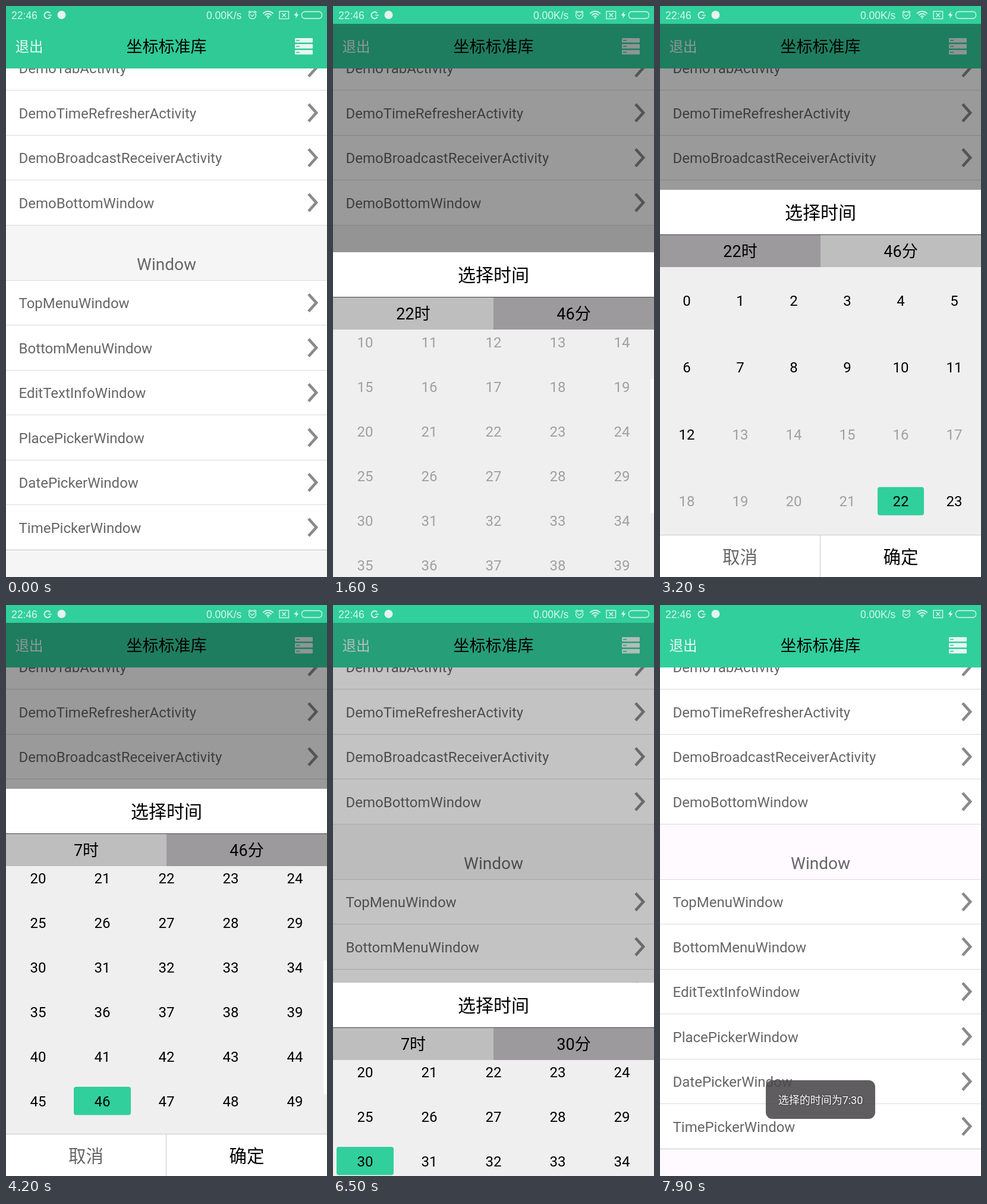
Write an HTML page with a canvas that moves like this. It is 540 px wide and 960 px high and loops after 8.1 s.

```html
<!DOCTYPE html>
<html lang="zh">
<head>
<meta charset="utf-8">
<title>选择时间</title>
<style>
html, body { margin: 0; width: 100%; height: 100%; overflow: hidden; background: #fff; }
canvas { display: block; width: 540px; height: 960px; }
</style>
</head>
<body>
<canvas id="stage" width="540" height="960"></canvas>
<script>
const ctx = document.getElementById('stage').getContext('2d');
const LOOP = 8100;
const STEP = 100;
const SANS = 'Roboto, "Noto Sans CJK SC", "Noto Sans CJK", sans-serif';
const GREEN = '#31cf9b';
const PANEL_H = 651;
const GRID_H = 450;
const MAX_SCROLL = 317.5;

// Row centre and label
const ROWS = [
  [104.5, 'DemoTabActivity'],
  [180, 'DemoTimeRefresherActivity'],
  [255.5, 'DemoBroadcastReceiverActivity'],
  [331, 'DemoBottomWindow'],
  [499.5, 'TopMenuWindow'],
  [575, 'BottomMenuWindow'],
  [650.5, 'EditTextInfoWindow'],
  [726, 'PlacePickerWindow'],
  [801.5, 'DatePickerWindow'],
  [877, 'TimePickerWindow']
];

const clamp = v => Math.min(1, Math.max(0, v));
const span = (t, a, b) => clamp((t - a) / (b - a));
const ease = p => (1 - Math.cos(Math.PI * p)) / 2;

function rect(x, y, w, h, color) {
  ctx.fillStyle = color;
  ctx.fillRect(x, y, w, h);
}

function round(x, y, w, h, r, color) {
  ctx.fillStyle = color;
  ctx.beginPath();
  ctx.roundRect(x, y, w, h, r);
  ctx.fill();
}

function text(str, x, y, size, color, align = 'center', family = SANS) {
  ctx.font = `${size}px ${family}`;
  ctx.textAlign = align;
  ctx.fillStyle = color;
  ctx.fillText(str, x, y);
}

function line(points, width, color) {
  ctx.strokeStyle = color;
  ctx.lineWidth = width;
  ctx.beginPath();
  points.forEach(([x, y]) => ctx.lineTo(x, y));
  ctx.stroke();
}

function arc(x, y, r, a, b, width = 1.4) {
  ctx.lineWidth = width;
  ctx.beginPath();
  ctx.arc(x, y, r, a, b);
  ctx.stroke();
}

function drawList(pressed, gap) {
  rect(0, 0, 540, 960, '#fff');
  rect(0, 368, 540, 93, gap);
  rect(0, 915, 540, 45, gap);
  if (pressed) rect(0, 839, 540, 75, '#dedede');
  for (const [y, label] of ROWS) {
    text(label, 21.5, y + 8.5, 24, '#666', 'left');
    line([[509, y - 15], [522, y - 0.5], [509, y + 14]], 4.8, '#8a8a8a');
    rect(0, Math.floor(y + 37), 540, 1, y > 870 ? '#c4c4c8' : '#dadada');
  }
  rect(0, 461, 540, 1, '#dedade');
  text('Window', 270, 444, 28, '#666');
}

function drawHeader(green) {
  rect(0, 0, 540, 105, green);
  text('退出', 15.5, 77, 23.5, '#effbf6', 'left');
  text('坐标标准库', 270, 78, 27, '#000');
  for (let y = 54; y < 80; y += 10) {
    round(486, y, 30, 7.5, 1, '#e6f7f0');
    rect(488, y + 3, 6, 1.5, green);
  }
}

function drawStatus(green) {
  const ink = '#d8f6ea';
  const family = '"Liberation Sans", Arial, sans-serif';
  rect(0, 0, 540, 30, green);
  text('22:46', 9, 21.5, 17.5, ink, 'left', family);
  text('0.00K/s', 337, 21.5, 17.5, ink, 'left', family);
  ctx.strokeStyle = ink;
  arc(70, 15.5, 5.5, 0.5, 5.6, 2);
  line([[71, 15.5], [77, 15.5]], 1.5, ink);
  ctx.fillStyle = '#e4f4ed';
  ctx.beginPath();
  ctx.arc(93.5, 15, 7, 0, 7);
  ctx.fill();
  // alarm clock
  arc(414.5, 15.5, 6, 0, 7);
  line([[411, 14.5], [414, 17.5], [418, 14]], 1.2, ink);
  line([[407.5, 11], [411, 8]], 1.5, ink);
  line([[418, 8], [421.5, 11]], 1.5, ink);
  // wifi
  for (const r of [3.5, 7.5, 11.5]) arc(441, 20.5, r, -Math.PI * 0.77, -Math.PI * 0.23, 1.9);
  round(439.7, 18.7, 2.6, 2.6, 1.3, ink);
  // no card
  ctx.lineWidth = 1.4;
  ctx.strokeRect(460, 9, 15.5, 12.5);
  line([[464.5, 12], [471, 18.5]], 1.4, ink);
  line([[471, 12], [464.5, 18.5]], 1.4, ink);
  // charging bolt
  ctx.fillStyle = ink;
  ctx.beginPath();
  [[490, 9], [484.5, 16], [488, 16], [487, 21], [492.5, 14], [489, 14]]
    .forEach(([x, y]) => ctx.lineTo(x, y));
  ctx.fill();
  // battery
  ctx.lineWidth = 1.3;
  ctx.beginPath();
  ctx.roundRect(497.5, 9.5, 34, 11.5, 5);
  ctx.stroke();
}

function drawGrid(top, grid) {
  const { count, cols, rowH, scroll, picked, enabled } = grid;
  const colW = 540 / cols;
  for (let i = 0; i < count; i++) {
    const x = (i % cols + 0.5) * colW;
    const y = top + (Math.floor(i / cols) + 0.5) * rowH - scroll;
    if (y < top - rowH || y > top + GRID_H + rowH) continue;
    if (i === picked) round(x - colW / 2 + 6, y - 24, colW - 12, 47.5, 4, GREEN);
    text(i, x, y + 8.5, 24, enabled(i) ? '#000' : '#a0a0a0');
  }
}

function drawPanel(top, s) {
  ctx.save();
  ctx.translate(0, top);
  rect(0, 0, 540, PANEL_H, '#efefef');
  rect(0, 0, 540, 75, '#fff');
  text('选择时间', 270, 49, 30, '#000');
  rect(0, 76, 270, 54, s.hourTab ? '#9c9a9c' : '#bebebe');
  rect(270, 76, 270, 54, s.hourTab ? '#bebebe' : '#9c9a9c');
  rect(0, 75, 540, 1, '#444');
  text(s.hour + '时', 135, 112.5, 27, '#000');
  text(s.minute + '分', 405, 112.5, 27, '#000');

  ctx.save();
  ctx.beginPath();
  ctx.rect(0, 130, 540, GRID_H);
  ctx.clip();
  if (s.hourTab) {
    drawGrid(130, {
      count: 24, cols: 6, rowH: 112.5, scroll: 0, picked: s.hour,
      enabled: i => i <= 12 || i >= 22
    });
  } else {
    drawGrid(130, {
      count: 60, cols: 5, rowH: 75, scroll: s.scroll, picked: s.minute,
      enabled: i => s.hour < 22 || i >= 46
    });
    rect(534, 130 + s.scroll / 2, 6, GRID_H / 2, `rgba(255,255,255,${0.75 * s.bar})`);
  }
  ctx.restore();

  rect(0, 581, 269, 70, '#fff');
  rect(270, 581, 270, 70, s.confirm ? '#efefef' : '#fff');
  rect(0, 580, 540, 1, '#c8c8c8');
  rect(269, 581, 1, 70, '#c8c8c8');
  text('取消', 134.5, 628, 29.5, '#666');
  text('确定', 405, 628, 29.5, '#000');
  ctx.restore();
}

function drawToast(alpha) {
  ctx.save();
  ctx.globalAlpha = alpha;
  round(178, 799, 184, 65, 11, 'rgba(75,71,75,0.88)');
  ctx.shadowColor = 'rgba(0,0,0,0.6)';
  ctx.shadowBlur = 3;
  text('选择的时间为7:30', 270, 838.5, 18, '#fff');
  ctx.restore();
}

function stateAt(t) {
  const reopened = t >= 3600;
  const scrollStart = reopened ? 3600 : 1490;
  const scrollEnd = reopened ? 3900 : 1700;
  return {
    hourTab: t >= 2200 && t < 3600,
    hour: t >= 3400 ? 7 : 22,
    minute: t >= 4300 ? 30 : 46,
    scroll: MAX_SCROLL * span(t, scrollStart, scrollEnd),
    bar: 1 - span(t, scrollEnd + 300, scrollEnd + 550),
    confirm: t >= 5500
  };
}

function draw(t) {
  const open = ease(span(t, 1379, 1679)) - ease(span(t, 6400, 6600));
  const green = t < 100 ? '#2fca95' : GREEN;
  const gap = t < 100 || open > 0 ? '#f5f5f5' : '#fefaff';
  drawList(t >= 900 && t < 1400, gap);
  drawHeader(green);
  if (open > 0) {
    rect(0, 30, 540, 930, `rgba(0,0,0,${0.395 * clamp(open * 1.2)})`);
    drawPanel(Math.round(960 - PANEL_H * open), stateAt(t));
  }
  drawStatus(green);
  const toast = span(t, 6600, 7100);
  if (toast > 0) drawToast(toast);
}

function frame() {
  const t = performance.now() % LOOP;
  draw(Math.floor(t / STEP) * STEP);
  requestAnimationFrame(frame);
}
frame();
</script>
</body>
</html>
```
